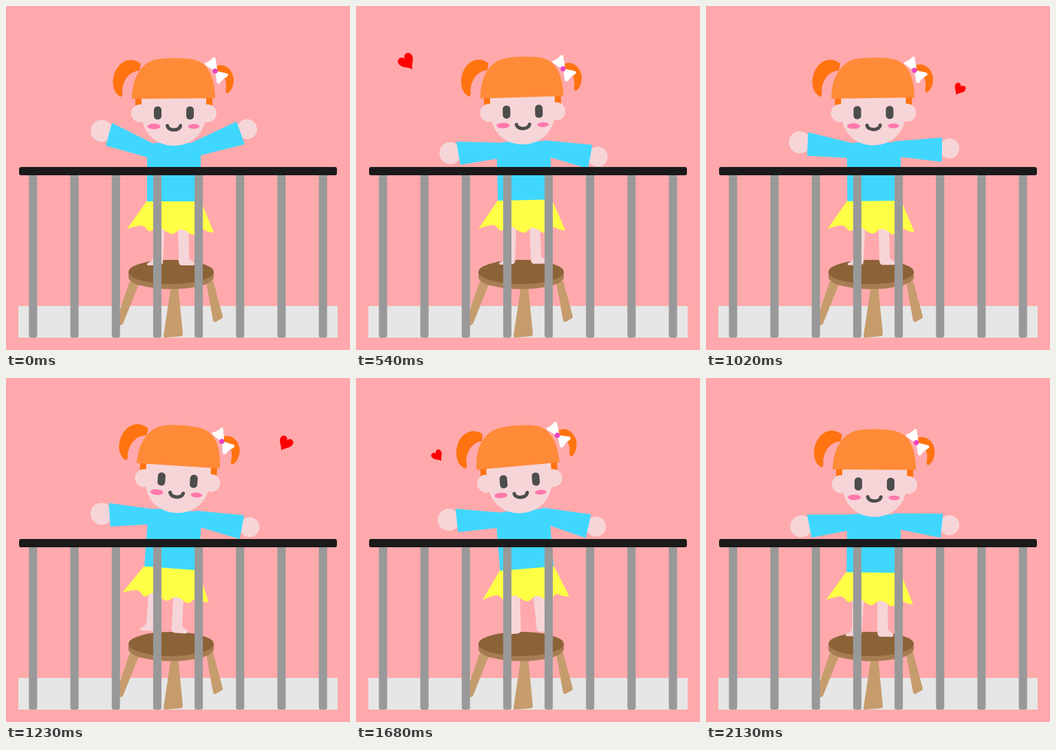
Write an HTML page that moves like this. It is 500 by 500 pixels and loops after 2.16 s.

```html
<!DOCTYPE html>
<html lang="en">
<head>
<meta charset="utf-8">
<title>Girl on a stool</title>
<style>
html, body { margin: 0; width: 100%; height: 100%; overflow: hidden; background: #ffa9ac; }
svg { display: block; width: 100vw; height: 100vh; }
.skin { fill: #f6d5d8; }
.shirt { fill: #40d7ff; }
.tail { fill: #ff7310; }
.eye { fill: #4d4d4d; }
.cheek { fill: #ff78ac; }
.wood { fill: #c69c6d; }
</style>
</head>
<body>
<svg viewBox="0 0 500 500">
  <rect width="500" height="500" fill="#ffa9ac"/>
  <rect x="18" y="436" width="464" height="46" fill="#e6e6e6"/>

  <g id="stool">
    <path class="wood" d="M180 400L194 402L170 462Q167 466 158 463ZM240 406H250L257 476Q257 480 254 480L232 482Q229 482 229 479ZM291 402L301 399L315 451Q315 454 312 455L305 459Q302 460 301 457Z"/>
    <path fill="#a67c52" d="M178 386V394A62 17.5 0 0 0 302 394V386Z"/>
    <ellipse cx="240" cy="386.5" rx="62" ry="17.5" fill="#8c6239"/>
  </g>

  <g id="girl">
    <path class="skin" d="M214 315H231L228 373Q227 377 222 377H207Q202 376 207 373Q213 371 214 364ZM250 315H265L266 364Q266 369 272 371Q277 375 272 377H255Q251 376 251 371Z"/>
    <path fill="#ffff46" d="M205 283H283L302 329Q295 330 289 326Q283 322 278 329Q273 335 267 331Q257 322 250 326Q244 333 239 331Q233 329 228 324Q222 319 215 324Q209 331 204 324Q199 317 191 320Q184 321 176 324Z"/>
    <g id="left">
      <circle class="skin" cx="139" cy="181.5" r="16"/>
      <path class="shirt" d="M154 170L212 199L222 215L206 220L145 203Z"/>
    </g>
    <g id="right">
      <circle class="skin" cx="350.5" cy="179" r="14.5"/>
      <path class="shirt" d="M335 168L271 198L264 214L283 217L347 201Z"/>
    </g>
    <path class="shirt" d="M205 284V201L217 199H270L283 202V284Z"/>

    <path class="tail" d="M196 84C184 74 169 78 161 91C152 106 154 126 167 132Q170 131 169 121C171 107 179 95 194 94ZM304 88C317 82 329 91 331 106Q331 121 322 127Q318 127 320 117Q321 100 305 96ZM188 130H200V145H188ZM291 130H300V145H291Z"/>
    <circle class="skin" cx="195" cy="156" r="13"/>
    <circle class="skin" cx="293" cy="156" r="13"/>
    <path class="skin" d="M197 130H291V154C291 184 271 203 244 203S197 184 197 154Z"/>
    <path fill="#ff8a38" d="M183 135C183 103 198 80 222 77Q244 74 268 77C291 80 303 97 304 134Z"/>
    <path fill="#fff" d="M303 95L289 85Q288 83 291 82Q297 80 301 75Q305 73 305 79L307 92ZM304 94L321 98Q325 100 321 103Q315 106 311 112Q307 115 306 109Z"/>
    <circle cx="304" cy="94.5" r="3.7" fill="#ea45c0"/>
    <rect class="eye" x="215" y="146" width="11" height="19" rx="5"/>
    <rect class="eye" x="262" y="146" width="11" height="19" rx="5"/>
    <ellipse class="cheek" cx="215" cy="175" rx="9.5" ry="4"/>
    <ellipse class="cheek" cx="273" cy="175" rx="8.3" ry="3.5"/>
    <path d="M234.5 174C236 182 252 182 253.500 174" fill="none" stroke="#4d4d4d" stroke-width="5" stroke-linecap="round"/>
  </g>

  <path id="heart" fill="#f00" d="M0 13C-3 6-11 3-11-4C-11-12-1-12 0-5C1-12 11-12 11-4C11 3 3 6 0 13Z"/>
  <g id="bars" fill="#999"></g>
  <rect x="19" y="234" width="462" height="12" rx="3" fill="#1a1a1a"/>
</svg>
<script>
const LOOP = 2160, STEP = 30, SWAY = 1050;
const $ = id => document.getElementById(id);

// [time, angle] keys
const sway = [[0, 0], [180, 4.2], [300, 5.5], [540, -1.3], [630, -4.7], [690, -5.2], [780, -3.8], [SWAY, 0]];
const leftArm = [[0, 0], [240, 20.5], [540, -25], [780, -5.3], [1230, -18.8], [1680, -21.5], [2130, -26.5]];
const rightArm = [[0, 0], [240, 9], [540, -30.5], [780, -8.5], [1230, -30.5], [1680, -33], [2130, -25.5]];

const hearts = [
  { from: 150, to: 690, at: 240, x: 122, y: 121, vx: -.16, vy: -.133, size: 19, turn: -36 },
  { from: 870, to: 1410, at: 1230, x: 406, y: 95, vx: .18, vy: -.122, size: 22, turn: 30 },
  { from: 1590, to: 2100, at: 1680, x: 118.5, y: 113, vx: -.157, vy: -.123, size: 17.5, turn: -36 }
];

const linear = u => u;
const smooth = u => (1 - Math.cos(Math.PI * u)) / 2;

function valueAt(keys, t, ease) {
  const i = keys.findIndex(k => k[0] > t);
  if (i < 0) return keys[keys.length - 1][1];
  const [t0, a] = keys[i - 1], [t1, b] = keys[i];
  return a + (b - a) * ease((t - t0) / (t1 - t0));
}

const move = (id, transform) => $(id).setAttribute("transform", transform);

function drawHeart(t) {
  const h = hearts.find(h => t >= h.from && t <= h.to);
  $("heart").style.display = h ? "" : "none";
  if (!h) return;
  const d = t - h.at, scale = (h.size + d * .02) / 24;
  move("heart", `translate(${h.x + h.vx * d} ${h.y + h.vy * d}) rotate(${h.turn}) scale(${scale})`);
}

function draw(now) {
  const t = Math.floor(now % LOOP / STEP) * STEP;
  const tilt = valueAt(sway, t % SWAY, linear);
  const lift = tilt > 0 ? tilt * 1.75 : -tilt * 1.4;
  move("girl", `translate(0 ${-lift}) rotate(${tilt} 241 230)`);
  // the arms keep their own angle while the body tilts
  move("left", `rotate(${valueAt(leftArm, t, smooth) - tilt} 214 201)`);
  move("right", `rotate(${-valueAt(rightArm, t, smooth) - tilt} 273 203)`);
  drawHeart(t);
  requestAnimationFrame(() => draw(performance.now() - start));
}

$("bars").innerHTML = Array.from({ length: 8 }, (_, i) =>
  `<rect x="${33.3 + i * 60.2}" y="240" width="12" height="242" rx="3"/>`).join("");

const start = performance.now();
draw(0);
</script>
</body>
</html>
```
